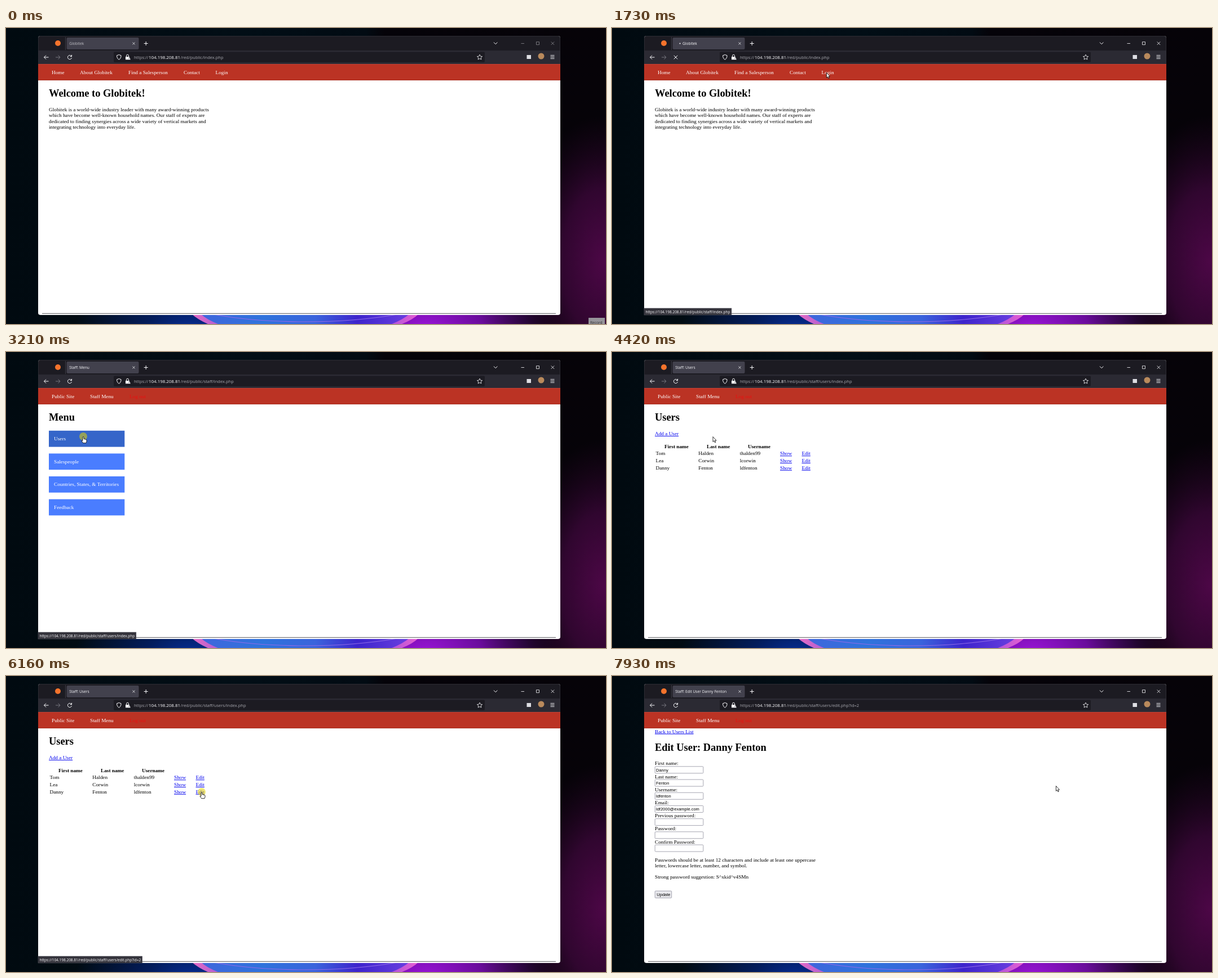
Recreate the animation shown at these times as an HTML page. Size 1064 by 526 pixels, loop 8 s.

```html
<!DOCTYPE html>
<html lang="en">
<head>
<meta charset="utf-8">
<title>Staff site walkthrough</title>
<style>
html, body { margin: 0; width: 100%; height: 100%; overflow: hidden; background: #02080e; }
svg { display: block; width: 1064px; height: 526px; }
text { font: 9.25px 'Liberation Serif', serif; }
.b { font-weight: bold; }
.h { font-weight: bold; font-size: 18.4px; }
.a { fill: #00e; text-decoration: underline; }
.w { fill: #fff; }
.out { fill: #ea1010; }
.in { font: 7.5px 'Liberation Sans', sans-serif; }
.ui { font: 6.65px 'Open Sans', 'Noto Sans', sans-serif; fill: #fbfbfe; }
.url { font-size: 7.5px; fill: #a9a9b0; }
.host { font-size: 7.9px; }
.status { font-size: 6.5px; }
.ic { fill: none; stroke: #fbfbfe; stroke-width: 1; }
.thin { stroke-width: .8; }
</style>
</head>
<body>
<svg id="stage" viewBox="0 0 1064 526">
  <defs>
    <linearGradient id="sky"><stop offset="0" stop-color="#010a10"/><stop offset=".4" stop-color="#020e16"/><stop offset=".6" stop-color="#020b13"/><stop offset=".63" stop-color="#050309"/><stop offset="1" stop-color="#060308"/></linearGradient>
    <radialGradient id="blue"><stop offset="0" stop-color="#0730a0"/><stop offset=".4" stop-color="#031c5c"/><stop offset="1" stop-color="#031c5c" stop-opacity="0"/></radialGradient>
    <radialGradient id="violet"><stop offset="0" stop-color="#9a14d8"/><stop offset=".4" stop-color="#6a0c9c"/><stop offset="1" stop-color="#380650" stop-opacity="0"/></radialGradient>
    <radialGradient id="plum"><stop offset="0" stop-color="#4c0746"/><stop offset=".5" stop-color="#30062f"/><stop offset="1" stop-color="#200420" stop-opacity="0"/></radialGradient>
    <linearGradient id="rim"><stop offset="0" stop-color="#e76cc4"/><stop offset=".2" stop-color="#8a55dc"/><stop offset=".8" stop-color="#8a4ce0"/><stop offset="1" stop-color="#e85fd0"/></linearGradient>
    <linearGradient id="lens"><stop offset="0" stop-color="#3f66dc"/><stop offset=".3" stop-color="#2f73dc"/><stop offset=".55" stop-color="#3a63dc"/><stop offset=".75" stop-color="#3d24cc"/><stop offset="1" stop-color="#6a3fe0"/></linearGradient>
  </defs>
  <rect width="1064" height="526" fill="url(#sky)"/>
  <ellipse cx="330" cy="545" rx="210" ry="130" fill="url(#blue)"/>
  <ellipse cx="745" cy="535" rx="250" ry="150" fill="url(#violet)"/>
  <ellipse cx="1060" cy="415" rx="150" ry="260" fill="url(#plum)"/>
  <path d="M329 508H732Q722 518 702 526H358Q340 518 329 508Z" fill="url(#rim)"/>
  <path d="M345 508H716Q704 518 684 526H376Q356 518 345 508Z" fill="url(#lens)"/>
  <path d="M368 509Q440 522 530 522T694 509" fill="none" stroke="#8f6be8" stroke-width="1.2"/>
  <g id="record"><rect x="1033" y="515" width="29" height="11" fill="#96949a"/><text class="ui" x="1036" y="525.5" style="fill:#333">Record</text></g>

  <rect x="57" y="14" width="926" height="496" rx="4" fill="#fff"/>
  <path d="M57 64V18Q57 14 61 14H979Q983 14 983 18V64Z" fill="#1c1b22"/>
  <path d="M57 40H983V64H57Z" fill="#2b2a33"/>
  <path d="M57.5 64V18Q57.5 14.5 61 14.5H979Q982.5 14.5 982.5 18V64" fill="none" stroke="#34343c" stroke-width=".7"/>
  <path d="M105.5 16V39" stroke="#3b3a44"/>
  <rect x="107.500" y="17" width="128" height="21" rx="2" fill="#42414d"/>
  <rect x="191" y="42.500" width="658" height="18.500" rx="2" fill="#1c1b22"/>
  <circle cx="92" cy="27" r="5" fill="#f5732c"/>
  <circle cx="949" cy="50" r="5.500" fill="#b98a5c"/>
  <rect x="923.500" y="48" width="7.500" height="7" fill="#dedee3"/>
  <g class="ic">
    <path class="thin" d="M224.500 25.500l4 4m0-4l-4 4"/>
    <path d="M244.700 27.500h7M248.200 24v7M865 25.500l3.200 3.200 3.200-3.200"/>
    <path d="M75.500 52H67.500M71 48.500L67.500 52L71 55.500"/>
    <path d="M88 52H96M92.500 48.500L96 52L92.500 55.500" stroke="#77767f"/>
    <path d="M965.500 48.700h7M965.500 51.500h7M965.500 54.300h7"/>
    <path d="M200.300 47.500L204 48.800Q204.200 54 200.300 56.200Q196.400 54 196.600 48.800Z"/>
    <path d="M213.500 51V49.500Q213.500 47.300 215.500 47.300T217.500 49.500V51"/>
    <path class="thin" d="M840 47.200L841.400 50.200L844.600 50.600L842.200 52.800L842.900 56L840 54.400L837.100 56L837.800 52.800L835.400 50.600L838.600 50.200Z"/>
  </g>
  <path d="M212 51H218.500L220.800 56.300H212Z" fill="#fbfbfe"/>
  <path d="M218 52.500V54.600" stroke="#1c1b22" stroke-width=".8"/>
  <path id="controls" class="ic thin" d="M913.500 27.500h5.500M940.500 24.700h5v5h-5zM966.700 24.500l5.500 5.500m0-5.500l-5.500 5.500"/>
  <path id="reload" class="ic" d="M116 50A3.600 3.600 0 1 0 116.500 53M116.500 47.700V50.700H113.500"/>
  <path id="stop" class="ic" d="M109.700 48.800l6.500 6.500m0-6.500l-6.500 6.500"/>
  <circle id="dot" cx="120.500" cy="27.500" r="1.100" fill="#fbfbfe"/>
  <text id="title" class="ui" y="30"></text>
  <text class="ui url" x="227" y="54.700">https://</text>
  <text class="ui host" x="253" y="54.700">104.198.208.81</text>
  <text id="path" class="ui url" x="309.500" y="54.700"></text>

  <rect x="57" y="64" width="926" height="29" fill="#bb3324"/>
  <path d="M57 64.400H983" stroke="#c9483a" stroke-width=".8"/>
  <path d="M57 92.600H983" stroke="#a52c1f" stroke-width=".8"/>
  <path d="M64 507.300H975" stroke="#56565a" stroke-width="1"/>
  <g id="pages"></g>
  <g id="status"><rect x="57" y="498" height="12" fill="#35343c" stroke="#55545f" stroke-width=".6"/><text class="ui status" x="59.500" y="506.700"></text></g>
  <circle id="click" r="7" fill="#e6d400" fill-opacity=".54"/>
  <g id="cursor" fill="#fff" stroke="#000" stroke-width=".8" stroke-linejoin="round">
    <path id="arrow" d="M.4 .4V9.400L2.400 7.600L3.900 10.800L5.300 10.200L3.900 7.100H6.500Z"/>
    <path id="hand" d="M-1 1.200Q0-.4 1 1.200V4.500L5 5.400Q6 5.700 6 7V9L5 11.700H-.3L-2.900 8Q-3.200 6.300-1 7.500Z"/>
  </g>
</svg>
<script>
const $ = id => document.getElementById(id);
const txt = (x, y, s, cls = '') => `<text x="${x}" y="${y}" class="${cls}">${s}</text>`;
const lines = (y, rows) => rows.map((s, i) => txt(76, y + i * 10.44, s)).join('');
const nav = items => items.map(([x, s, cls = 'w']) => txt(x, 82.3, s, cls)).join('');
const staffNav = nav([[81, 'Public Site'], [149, 'Staff Menu'], [219, 'Log out', 'out']]);

const home = nav([[81, 'Home'], [131, 'About Globitek'], [217, 'Find a Salesperson'], [315, 'Contact'], [371.5, 'Login']]) +
  txt(76, 122, 'Welcome to Globitek!', 'h') +
  lines(148, ['Globitek is a world-wide industry leader with many award-winning products',
    'which have become well-known household names. Our staff of experts are',
    'dedicated to finding synergies across a wide variety of vertical markets and',
    'integrating technology into everyday life.']);

const menu = staffNav + txt(76, 122, 'Menu', 'h') +
  ['Users', 'Salespeople', 'Countries, States, &amp; Territories', 'Feedback'].map((s, i) =>
    `<rect ${i ? '' : 'id="first"'} x="76" y="${139.8 + i * 40.6}" width="134.3" height="28.8" fill="#4a7dff"/>` +
    txt(85, 157 + i * 40.6, s, 'w')).join('');

const cols = [77.5, 153.3, 226.7, 298, 336.5];
const users = staffNav + txt(76, 122, 'Users', 'h') + txt(76, 148, 'Add a User', 'a') +
  txt(93, 170.5, 'First name', 'b') + txt(168, 170.5, 'Last name', 'b') + txt(241, 170.5, 'Username', 'b') +
  [['Tom', 'Halden', 'thalden99'], ['Lea', 'Corwin', 'lcorwin'], ['Danny', 'Fenton', 'ldfenton']].map((row, r) =>
    [...row, 'Show', 'Edit'].map((s, c) => txt(cols[c], 183.3 + r * 12.75, s, c > 2 ? 'a' : '')).join('')).join('');

const fields = [['First name', 'Danny'], ['Last name', 'Fenton'], ['Username', 'ldfenton'],
  ['Email', 'ldf2000@example.com'], ['Previous password', ''], ['Password', ''], ['Confirm Password', '']];
const box = (y, w, h, fill) =>
  `<rect x="76.2" y="${y}" width="${w}" height="${h}" rx="1.2" fill="${fill}" stroke="#8f8f9d" stroke-width=".8"/>`;
const edit = staffNav + txt(76, 101.6, 'Back to Users List', 'a') + txt(76, 132.8, 'Edit User: Danny Fenton', 'h') +
  fields.map(([label, value], i) => {
    const y = i * 23.2;
    return txt(76, 158.3 + y, label + ':') + box(160.8 + y, 85.6, 12, '#fff') + txt(78, 169.6 + y, value, 'in');
  }).join('') +
  lines(330, ['Passwords should be at least 12 characters and include at least one uppercase',
    'letter, lowercase letter, number, and symbol.']) +
  txt(76, 360, 'Strong password suggestion: S^xkid^v4SMn') +
  box(382, 29.5, 12.4, '#e9e9ed') + txt(79.3, 390.9, 'Update', 'in');

const root = '/red/public/';
const pages = [
  { from: 0, title: 'Globitek', path: 'index.php', body: home },
  { from: 1790, title: 'Staff: Menu', path: 'staff/index.php', body: menu },
  { from: 3610, title: 'Staff: Users', path: 'staff/users/index.php', body: users },
  { from: 6500, title: 'Staff: Edit User Danny Fenton', path: 'staff/users/edit.php?id=2', body: edit }
];
$('pages').innerHTML = pages.map(p => `<g>${p.body}</g>`).join('');

const loading = [[1290, 1860], [3280, 3750], [6300, 6770]];
const hands = [[1080, 1290], [3090, 3610], [5330, 5770], [5880, 6420]];
const clicks = [[1220, 1350], [3140, 3280], [6160, 6300]];
const link = p => 'https://104.198.208.81' + root + p;
const transfer = 'Transferring data from 104.198.208.81...';
const hints = [
  [1150, 1790, link('staff/index.php')], [1790, 1860, transfer],
  [3140, 3610, link('staff/users/index.php')], [3610, 3750, transfer],
  [5770, 5900, link('staff/users/show.php?id=2')], [6030, 6500, link('staff/users/edit.php?id=2')],
  [6500, 6770, transfer]
];
// cursor stops: time, x, y
const track = [
  [400, 975, 515], [700, 640, 250], [950, 420, 71], [1150, 380, 79], [2080, 380, 79],
  [2400, 290, 190], [2700, 208, 242], [2900, 202, 225], [3130, 137, 150], [4360, 137, 150],
  [4420, 178, 150], [4700, 340, 190], [4920, 433, 231], [5170, 338, 214], [5400, 311.5, 208],
  [5700, 311.5, 208], [5960, 347, 206], [6400, 347, 206], [6680, 396.500, 241], [7000, 396.500, 241],
  [7160, 372, 247], [7260, 372, 247], [7480, 620, 160], [7700, 932, 79], [7930, 787, 195], [8000, 787, 195]
];

const during = (list, t) => list.find(([a, b]) => t >= a && t < b);
const show = (el, on) => { el.style.display = on ? '' : 'none'; };

function cursorAt(t) {
  const i = Math.max(1, track.findIndex(k => k[0] > t));
  const [t0, x0, y0] = track[i - 1], [t1, x1, y1] = track[i];
  const p = Math.max(0, (t - t0) / (t1 - t0));
  return [x0 + (x1 - x0) * p, y0 + (y1 - y0) * p];
}

function draw(t) {
  const page = pages.findLast(p => t >= p.from);
  const busy = during(loading, t), focused = t >= 1220;
  pages.forEach((p, i) => show($('pages').children[i], p === page));
  $('first').setAttribute('fill', during(hands, t) ? '#3565c9' : '#4a7dff');

  $('title').textContent = page.title;
  $('title').setAttribute('x', busy ? 125 : 112.3);
  $('title').style.opacity = focused ? 1 : .7;
  $('controls').style.opacity = focused ? 1 : .5;
  $('path').textContent = root + page.path;
  show($('dot'), busy);
  show($('stop'), busy);
  show($('reload'), !busy);
  show($('record'), t < 70);

  const hint = during(hints, t);
  show($('status'), hint);
  if (hint) {
    const [panel, label] = $('status').children;
    label.textContent = hint[2];
    panel.setAttribute('width', label.getComputedTextLength() + 5);
  }

  const [x, y] = cursorAt(t), hand = during(hands, t);
  $('cursor').setAttribute('transform', `translate(${x} ${y})`);
  $('click').setAttribute('transform', `translate(${x} ${y})`);
  show($('cursor'), t >= 400);
  show($('hand'), hand);
  show($('arrow'), !hand);
  show($('click'), during(clicks, t));
}

const start = performance.now();
function tick() {
  draw((performance.now() - start) % 8000);
  requestAnimationFrame(tick);
}
tick();
</script>
</body>
</html>
```
